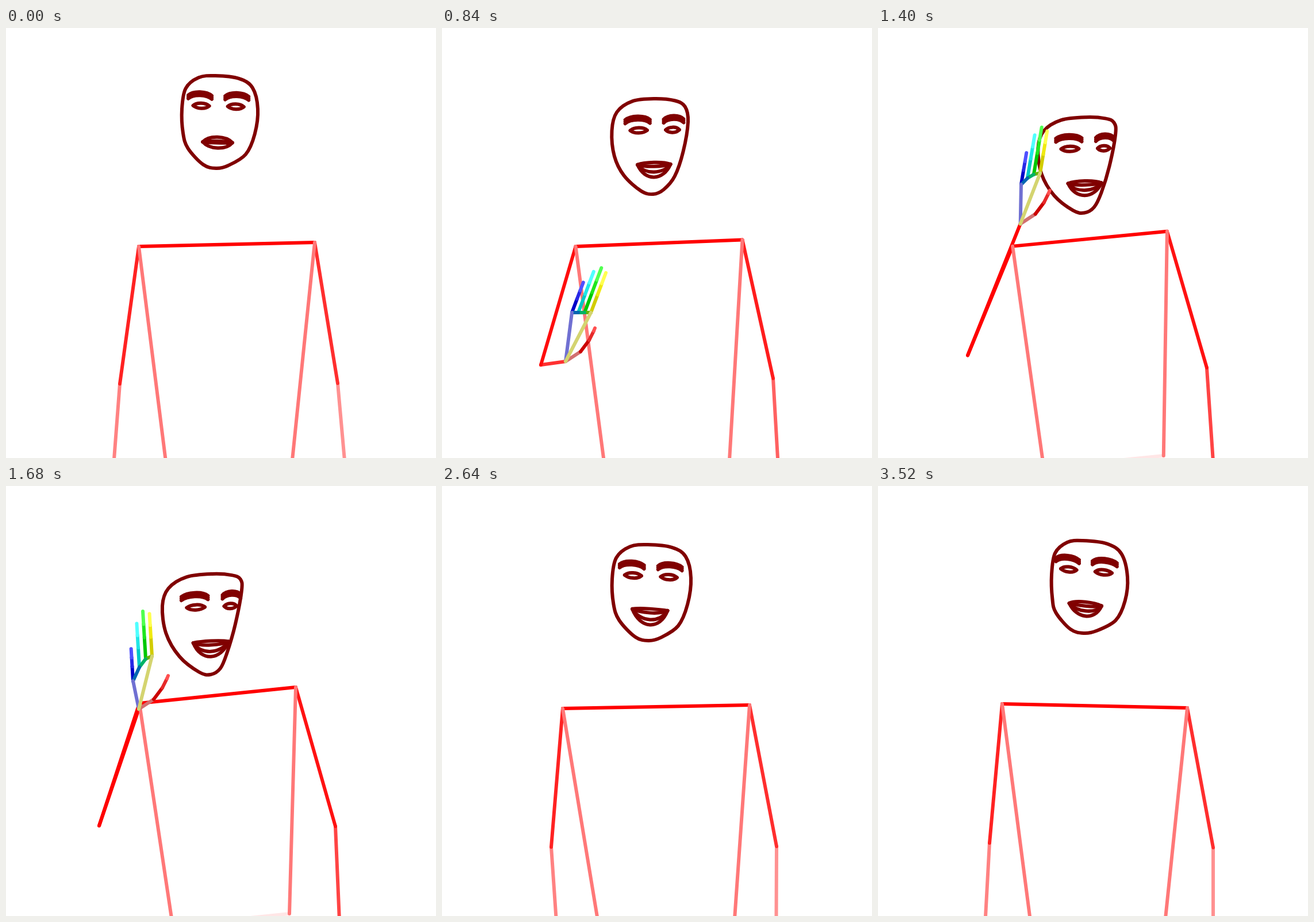
Animation of 748x748 px, one loop 3.56 s. Source, as an HTML page with a canvas:

```html
<!DOCTYPE html>
<html lang="en">
<head>
<meta charset="utf-8">
<title>Pose skeleton</title>
<style>
html, body { margin: 0; width: 100%; height: 100%; overflow: hidden; background: #fff; }
canvas { display: block; }
</style>
</head>
<body>
<canvas id="stage" width="748" height="748"></canvas>
<script>
const ctx = document.getElementById('stage').getContext('2d');
const LOOP = 3560, STEP = 40;

// Key poses: time, shoulders, elbows, left wrist, then x of right wrist and both hips.
const bodyKeys = [
  [0, 231, 380, 537, 373, 198, 619, 577, 618, 179, 868, 598, 285, 492],
  [520, 229, 379, 543, 380, 193, 621, 581, 629, 168, 860, 587, 284, 498],
  [1160, 236, 381, 502, 357, 151, 551, 571, 590, 262, 300, 592, 287, 500],
  [1680, 232, 378, 504, 350, 162, 591, 573, 592, 231, 388, 583, 290, 493],
  [2200, 229, 374, 506, 351, 163, 594, 573, 602, 249, 414, 576, 288, 492],
  [2640, 210, 387, 535, 381, 190, 628, 582, 627, 206, 860, 581, 280, 505],
  [3520, 216, 379, 538, 386, 194, 621, 583, 629, 181, 860, 583, 272, 494]
];
// Time, left, top, right, bottom of the head, then turn, tilt and mouth opening.
const faceKeys = [
  [0, 306, 83, 438, 244, 0, 1.5, 0],
  [520, 307, 89, 440, 262, .3, -2, 16],
  [1160, 284, 157, 416, 316, .93, 0, 8],
  [1680, 272, 153, 410, 328, 1.05, -2.5, 15],
  [2200, 273, 142, 410, 314, .82, -1.5, 15],
  [2640, 296, 102, 433, 269, .07, 3, 16],
  [3520, 302, 95, 434, 256, -.18, 5, 10]
];
// Time, index knuckle relative to the wrist, slope of the knuckles, lean of the fingers.
const handKeys = [
  [1160, 44, -85, 0, .36],
  [1680, 23, -92, 4.8, -.06],
  [2200, 24, -76, 4, -.02]
];
// Head outline in its unit box, clockwise from the top, seen from the front and turned.
const frontOval = [.44, 0, .75, .03, .93, .13, 1, .36, .96, .63, .84, .85, .61, .97,
  .45, 1, .28, .96, .08, .785, .015, .62, 0, .36, .05, .137, .22, .02];
const turnedOval = [.62, 0, .87, .013, .98, .055, 1, .17, .92, .51, .815, .79, .725, .94,
  .6, 1, .455, .975, .21, .82, .044, .59, 0, .32, .075, .143, .3, .03];

const fingerLengths = [74, 83, 76, 56];
const fingerColors = [
  ['#d2cc00', '#f0ea10', '#ffff50'],
  ['#00c800', '#1ee61e', '#50ff50'],
  ['#00c8c8', '#20e6e6', '#50ffff'],
  ['#0000c8', '#2828e6', '#5050ff']
];
const knuckleColors = ['#66b200', '#00b266', '#0066b2'];
const thumb = [[0, 0], [26, -17], [41, -37], [49, -53], [51, -58]];
const thumbColors = ['#d27070', '#cc0000', '#e62a2a', '#ff5050'];

const mix = (a, b, k) => a.map((v, i) => v + (b[i] - v) * k);
const swing = (t, from, to) =>
  Math.sin(Math.PI * Math.min(1, Math.max(0, (t - from) / (to - from))));

function sample(keys, t) {
  const next = keys.findIndex(key => key[0] > t);
  if (next < 1) return keys.at(next).slice(1);
  const a = keys[next - 1], b = keys[next];
  return mix(a, b, (t - a[0]) / (b[0] - a[0])).slice(1);
}

function line(a, b, color) {
  ctx.strokeStyle = color;
  ctx.beginPath();
  ctx.moveTo(...a);
  ctx.lineTo(...b);
  ctx.stroke();
}

function chain(points, colors) {
  colors.forEach((color, i) => line(points[i], points[i + 1], color));
}

// Rounded bow between two corners; its middle lies `sag` below the chord.
function bow([x1, y1], [x2, y2], sag) {
  const inset = (x2 - x1) * .22, drop = sag * 4 / 3;
  ctx.beginPath();
  ctx.moveTo(x1, y1);
  ctx.bezierCurveTo(x1 + inset, y1 + drop, x2 - inset, y2 + drop, x2, y2);
  ctx.stroke();
}

function closedCurve(points) {
  const p = i => points[(i + points.length) % points.length];
  const handle = (i, sign) => [0, 1].map(k => p(i)[k] + sign * (p(i + 1)[k] - p(i - 1)[k]) / 6);
  ctx.beginPath();
  ctx.moveTo(...p(0));
  points.forEach((_, i) => ctx.bezierCurveTo(...handle(i, 1), ...handle(i + 1, -1), ...p(i + 1)));
  ctx.stroke();
}

function drawBody(pose, wrist, raised) {
  const [lx, ly, rx, ry, elx, ely, erx, ery, , , wristX, hipLX, hipRX] = pose;
  const red = (down, up) => {
    const v = down + (up - down) * raised;
    return `rgb(255, ${v}, ${v})`;
  };
  const shoulderL = [lx, ly], shoulderR = [rx, ry], elbowL = [elx, ely], elbowR = [erx, ery];
  const hipL = [hipLX, 810 - 45 * raised], hipR = [hipRX, 810 - 66 * raised];
  line(hipL, hipR, '#ffe6e6');
  line(shoulderL, shoulderR, '#ff0000');
  line(elbowL, wrist, red(130, 0));
  line(elbowR, [wristX, ery + 235], red(145, 68));
  line(shoulderL, elbowL, red(34, 0));
  line(shoulderR, elbowR, red(46, 18));
  line(shoulderL, hipL, '#ff7878');
  line(shoulderR, hipR, '#ff7878');
}

function drawFace(t) {
  const [left, top, right, bottom, turn, tilt, open] = sample(faceKeys, t);
  const lift = 9 * swing(t, 2640, 3520);
  const place = (u, v) => [left + u * (right - left), top + v * (bottom - top) - lift];
  const feature = (u, v) => {
    const [x, y] = place(u, v);
    return [x, y + tilt * 2.2 * (u - .5)];
  };
  ctx.strokeStyle = '#800000';

  const oval = mix(frontOval, turnedOval, turn), outline = [];
  for (let i = 0; i < oval.length; i += 2) outline.push(place(oval[i], oval[i + 1]));
  closedCurve(outline);

  for (const side of [-1, 1]) {
    const u = side < 0 ? .254 + .16 * turn : .71 + .14 * turn;
    const size = side < 0 ? 1 + .08 * turn : 1 - .25 * turn;
    const span = (center, half, v) => [feature(center - half * size, v), feature(center + half * size, v)];
    for (const sag of [-4.5, 4.5]) bow(...span(u, .105, .33), sag);
    for (const shift of [-.019, 0, .019]) bow(...span(u + side * .015, .155, .237 + shift), -6);
  }

  const center = .47 + .135 * turn, half = .195 + .0018 * open, v = .72 - .0025 * open;
  const upper = .45 * open - 9;
  for (const sag of [upper, upper + 7, open + 1, open + 10]) {
    bow(feature(center - half, v), feature(center + half, v), sag);
  }
}

function drawHand(t, wrist) {
  const [x, y, slope, lean] = sample(handKeys, t);
  const fromWrist = ([dx, dy]) => [wrist[0] + dx, wrist[1] + dy];
  const knuckles = fingerLengths.map((_, i) => fromWrist([x - 11 * i, y + slope * i * i]));
  chain(thumb.map(fromWrist), thumbColors);
  knuckles.forEach(([kx, ky], i) => {
    const joints = [0, .45, .73, 1].map(k => {
      const reach = fingerLengths[i] * k;
      return [kx + reach * Math.sin(lean), ky - reach * Math.cos(lean)];
    });
    chain(joints, fingerColors[i]);
  });
  chain(knuckles, knuckleColors);
  line(wrist, knuckles[3], '#7070d2');
  line(wrist, knuckles[0], '#d4d470');
}

function draw() {
  const t = Math.floor(performance.now() % LOOP / STEP) * STEP;
  const pose = sample(bodyKeys, t);
  const wrist = [pose[8] - 19 * swing(t, 0, 520) - 33 * swing(t, 2640, 3520), pose[9]];
  const raised = Math.min(1, Math.max(0, (860 - wrist[1]) / 450));
  ctx.clearRect(0, 0, 748, 748);
  ctx.lineWidth = 6;
  ctx.lineCap = ctx.lineJoin = 'round';
  drawBody(pose, wrist, raised);
  drawFace(t);
  if (wrist[1] < 600) drawHand(t, wrist);
  requestAnimationFrame(draw);
}
draw();
</script>
</body>
</html>
```
